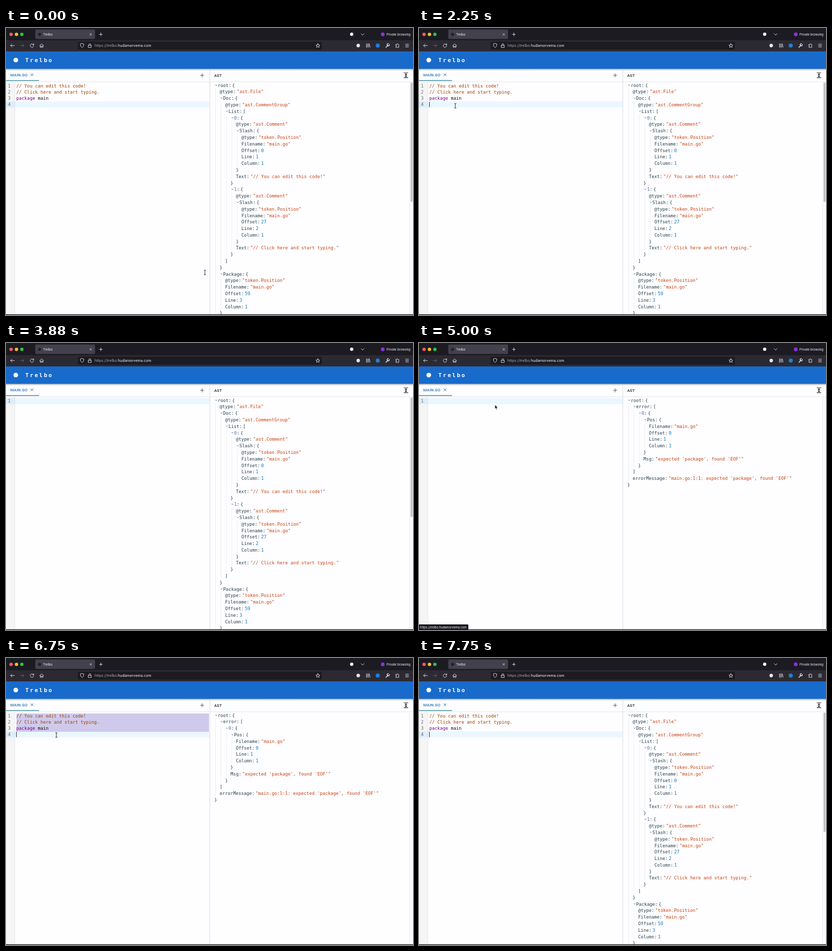
An HTML page that plays this animation: 800x564 px, repeating every 8000 ms.

```html
<!DOCTYPE html>
<html lang="en">
<head>
<meta charset="utf-8">
<title>Trelbo</title>
<style>
  html, body { margin: 0; width: 100%; height: 100%; overflow: hidden; background: #fefdff; }
  svg { display: block; width: 100vw; height: 100vh; }
  text { white-space: pre; }
  .ui { font-family: Inter, sans-serif; fill: #fbfbfe; }
  .tab { font: 500 7.7px Roboto, sans-serif; letter-spacing: .2px; }
  .brand { font: bold 11px "DejaVu Sans Mono", monospace; letter-spacing: 2.5px; fill: #fff; }
  .code { font: 8.75px "DejaVu Sans Mono", monospace; }
  .comment { fill: #994400; }
  .keyword { fill: #770088; }
  .plain { fill: #111; }
  .number { fill: #6c6c6c; }
  .key { fill: #24414a; }
  .index { fill: #5b6cbc; }
  .string { fill: #c4430f; }
  .int { fill: #0877c4; }
  .icon { fill: none; stroke: #e6e6ec; stroke-width: .9; stroke-linecap: round; stroke-linejoin: round; }
  .guide { stroke: #e7e6ea; stroke-width: .7; }
  .fold { fill: none; stroke: #3b5058; stroke-width: .8; }
</style>
</head>
<body>
<svg viewBox="0 0 800 564" preserveAspectRatio="none">
  <defs>
    <linearGradient id="shade" x2="0" y2="1">
      <stop stop-color="#000" stop-opacity=".3"/>
      <stop offset="1" stop-color="#000" stop-opacity="0"/>
    </linearGradient>
  </defs>
  <rect width="800" height="564" fill="#fefdff"/>

  <!-- Browser bars -->
  <rect width="800" height="24.5" fill="#1c1b22"/>
  <rect y="24" width="800" height="22" fill="#2b2a33"/>
  <circle cx="10" cy="12.5" r="3.3" fill="#ff5f57"/>
  <circle cx="20.6" cy="12.5" r="3.3" fill="#febc2e"/>
  <circle cx="31.2" cy="12.5" r="3.3" fill="#28c840"/>
  <rect x="57.5" y="3" width="117.5" height="18.5" rx="2.2" fill="#42414d"/>
  <circle cx="66" cy="12.5" r="3" fill="#202027"/>
  <text class="ui" x="73" y="14.8" font-size="6.2">Trelbo</text>
  <circle cx="679.5" cy="12.3" r="3.2" fill="#fbfbfe"/>
  <circle cx="740.5" cy="12.5" r="3.7" fill="#8b2fe0"/>
  <text class="ui" x="748" y="14.7" font-size="5.95">Private browsing</text>
  <rect x="141" y="27" width="480" height="15.5" rx="2.2" fill="#1c1b22"/>
  <text class="ui" x="174" y="37.4" font-size="7.2" style="fill:#a9a9b2">https://trelbo.</text>
  <text class="ui" x="220" y="37.4" font-size="7.2">hudamorvema.com</text>
  <g class="icon">
    <path d="M164.8 10.8l3.4 3.4m0-3.4l-3.4 3.4M183.5 12.5h6m-3-3v6M698 11l3 3 3-3"/>
    <path d="M16.5 34.5h-7.5m3-3l-3 3 3 3"/>
    <path d="M28 34.5h7m-3-3l3 3-3 3" stroke="#696873"/>
    <path d="M54 32.8a3.4 3.4 0 1 0 .5 2.3M54.5 30.8v2.3h-2.4"/>
    <path d="M66.2 34.6l3.8-3.6 3.8 3.6M67.3 34v4h1.8v-2.4h1.8v2.4h1.8v-4"/>
    <path d="M149.6 30.4l3.5 1.2q.2 5-3.5 7-3.7-2-3.5-7z"/>
    <path d="M162 34h5.6v4.2h-5.6zM163.2 34v-1.6a1.6 1.6 0 0 1 3.2 0v1.6"/>
    <path d="M613 30.7l1.1 2.6 2.8.2-2.1 1.8.7 2.8-2.5-1.5-2.5 1.5.7-2.8-2.1-1.8 2.8-.2z"/>
    <path d="M708.5 31v7m2.2-7v7m2.1-7v7m1.3-6.8l1.5 6.6"/>
    <path d="M746.8 38l4-4" stroke-width="1.6"/>
    <path d="M753.4 32.3a2.2 2.2 0 1 1-1.8-1.5" stroke-width="1.4"/>
    <path d="M766.3 32.6h1.7a1.2 1.2 0 1 1 2.3 0h1.8v5.4h-5.8v-1.6a1.2 1.2 0 1 0 0-2.3z"/>
    <path d="M785.3 31.8h6m-6 2.7h6m-6 2.7h6"/>
  </g>
  <circle cx="692.3" cy="34.5" r="3.4" fill="#e6e6ec"/>
  <circle cx="730.7" cy="34.5" r="4" fill="#1f7fd6"/>

  <!-- Page header and tabs -->
  <rect y="80" width="800" height="4" fill="url(#shade)"/>
  <rect y="46" width="800" height="34.3" fill="#186acb"/>
  <circle cx="19.2" cy="63" r="4.6" fill="#fff"/>
  <text class="brand" x="38" y="66.8">Trelbo</text>
  <text class="tab" x="8.6" y="95.2" fill="#1b72bd">MAIN.GO</text>
  <path d="M48.6 89.4l5 5m0-5l-5 5" stroke="#1b72bd"/>
  <path d="M381.8 93h7.4m-3.7-3.7v7.4" stroke="#555"/>
  <text class="tab" x="409.3" y="95.8" fill="#222">AST</text>
  <path d="M781.8 88h8.6m-8.6 9.6h8.6M786.1 90v5.8m-2-4l2-2 2 2m-4 2.200l2 2 2-2" fill="none" stroke="#222" stroke-width="1.1"/>
  <path d="M0 105.700h800" stroke="#dddce0" stroke-width=".8"/>
  <rect y="102.600" width="65" height="1.300" fill="#24808f"/>

  <!-- Editor -->
  <rect y="106" width="17.500" height="457" fill="#f5f5f6"/>
  <g id="activeLine">
    <rect y="108.300" width="17.500" height="12" fill="#dceefa"/>
    <rect x="17.500" y="108.300" width="382.500" height="12" fill="#ebf7fe"/>
  </g>
  <path d="M17.500 106v457" stroke="#dedde0" stroke-width=".7"/>
  <rect id="selection" x="20.500" y="109" width="378.500" height="36" fill="#cfc9ec"/>
  <g id="source" class="code">
    <text class="comment" x="20.300" y="117.300">// You can edit this code!</text>
    <text class="comment" x="20.300" y="129.300">// Click here and start typing.</text>
    <text class="plain" x="20.300" y="141.300"><tspan class="keyword">package</tspan> main</text>
    <text class="number" x="3.800" y="129.300">2</text>
    <text class="number" x="3.800" y="141.300">3</text>
    <text class="number" x="3.800" y="153.300">4</text>
  </g>
  <text class="code number" x="3.800" y="117.300">1</text>
  <rect id="caret" x="20" y="109" width=".9" height="10.500" fill="#111"/>

  <!-- Tree panel -->
  <path d="M400.700 81v482" stroke="#d8d7dc" stroke-width=".9"/>
  <rect x="793" y="106" width="7" height="457" fill="#fafafa"/>
  <path d="M793.300 106v457" stroke="#e4e3e7" stroke-width=".7"/>
  <g id="fileTree" class="code">
    <rect x="795.200" y="107" width="4" height="235" rx="2" fill="#c1c1c3"/>
  </g>
  <g id="errorTree" class="code"></g>

  <rect y="562.700" width="800" height="1.300" fill="#17161b"/>
  <g id="status">
    <path d="M0 553h95.500q1.500 0 1.500 1.500v9h-97z" fill="#1c1b22"/>
    <text class="ui" x="2" y="560.500" font-size="5.900">https://trelbo.hudamorvema.com</text>
  </g>

  <g id="pointer">
    <path id="beam" d="M-2-4.300q2 0 2 1.300 0-1.300 2-1.300M0-3v7M-2 5.200q2 0 2-1.300 0 1.300 2 1.300" fill="none" stroke="#111" stroke-width=".9"/>
    <path id="arrow" d="M0 0v8l1.900-1.700 1.300 3 1.400-.6-1.300-2.900h2.500z" fill="#111" stroke="#fff" stroke-width=".6"/>
  </g>
</svg>
<script>
const $ = id => document.getElementById(id);

function add(parent, tag, attrs, text) {
  const node = document.createElementNS(parent.namespaceURI, tag);
  for (const name in attrs) node.setAttribute(name, attrs[name]);
  if (text !== undefined) node.textContent = text;
  parent.appendChild(node);
}

// Collapsible tree, one row per property
const CHAR = 5.268, ROW = 12.79, INDENT = 10.65;

function drawTree(group, root) {
  let row = 0;
  const write = (x, type, text) =>
    add(group, 'text', { x, y: 115.7 + row * ROW, class: type }, text);

  function drawNode(key, value, level, inArray) {
    const base = 409.4 + level * INDENT;
    const nested = typeof value === 'object';
    const x = base + (nested ? 6.8 : 0);
    const label = String(key);
    const valueX = x + (label.length + 1) * CHAR + 2;
    write(x, inArray ? 'index' : 'key', label);
    write(x + label.length * CHAR, 'key', ':');
    if (!nested) {
      const isText = typeof value === 'string';
      write(valueX, isText ? 'string' : 'int', isText ? `"${value}"` : value);
      row++;
      return;
    }
    const list = Array.isArray(value);
    const top = 112.3 + row * ROW;
    add(group, 'path', { class: 'fold', d: `M${base + 2} ${top - .8}l1.7 1.6 1.7-1.6` });
    write(valueX, 'key', list ? '[' : '{');
    row++;
    for (const [name, child] of Object.entries(value)) drawNode(name, child, level + 1, list);
    const bottom = Math.min(562, 106 + row * ROW);
    add(group, 'path', { class: 'guide', d: `M${base + 2.4} ${top + 6.4}V${bottom}` });
    write(base, 'key', list ? ']' : '}');
    row++;
  }
  drawNode('root', root, 0, false);
}

const place = (Offset, Line) => ({ Filename: 'main.go', Offset, Line, Column: 1 });
const position = (offset, line) => ({ '@type': 'token.Position', ...place(offset, line) });
const comment = (offset, line, Text) =>
  ({ '@type': 'ast.Comment', Slash: position(offset, line), Text });

drawTree($('fileTree'), {
  '@type': 'ast.File',
  Doc: {
    '@type': 'ast.CommentGroup',
    List: [
      comment(0, 1, '// You can edit this code!'),
      comment(27, 2, '// Click here and start typing.')
    ]
  },
  Package: position(59, 3)
});

const problem = "expected 'package', found 'EOF'";
drawTree($('errorTree'), {
  error: [{ Pos: place(0, 1), Msg: problem }],
  errorMessage: 'main.go:1:1: ' + problem
});

// Timeline in ms; the screen refreshes every TICK
const LOOP = 8000, TICK = 125;
const path = [
  [125, 391, 480], [1000, 71.3, 152.500], [4000, 71.3, 152.500], [4500, 44, 66],
  [4750, 26, 62], [4875, 26, 62], [5000, 149.2, 121.5], [5375, 113, 160], [6000, 99, 151]
];

function pointerAt(t) {
  const next = path.findIndex(p => p[0] > t);
  if (next === 0) return path[0].slice(1);
  if (next < 0) return path[path.length - 1].slice(1);
  const [t0, x0, y0] = path[next - 1], [t1, x1, y1] = path[next];
  const u = (t - t0) / (t1 - t0), ease = u * u * (3 - 2 * u);
  return [x0 + (x1 - x0) * ease, y0 + (y1 - y0) * ease];
}

const during = (t, ...spans) => spans.some(([from, to]) => t >= from && t < to);
const show = (id, on) => $(id).setAttribute('visibility', on ? 'visible' : 'hidden');
const move = (id, x, y) => $(id).setAttribute('transform', `translate(${x} ${y})`);

function render() {
  const t = Math.floor(performance.now() % LOOP / TICK) * TICK;
  const empty = during(t, [2875, 6375]);
  const failed = during(t, [5000, 7000]);
  const arrow = during(t, [4125, 5125]);
  const hidden = during(t, [2875, 4000], [7000, LOOP]);
  const lineY = empty ? 0 : 36;

  show('source', !empty);
  show('selection', during(t, [2375, 2875], [6375, 7000]));
  show('caret', during(t, [875, 1500], [2125, 3500], [4125, 4750], [5750, LOOP]));
  show('fileTree', !failed);
  show('errorTree', failed);
  show('status', during(t, [4375, 5125]));
  show('beam', !hidden && !arrow);
  show('arrow', !hidden && arrow);
  move('activeLine', 0, lineY);
  move('caret', 0, lineY);
  move('pointer', ...pointerAt(t));
  requestAnimationFrame(render);
}
render();
</script>
</body>
</html>
```
